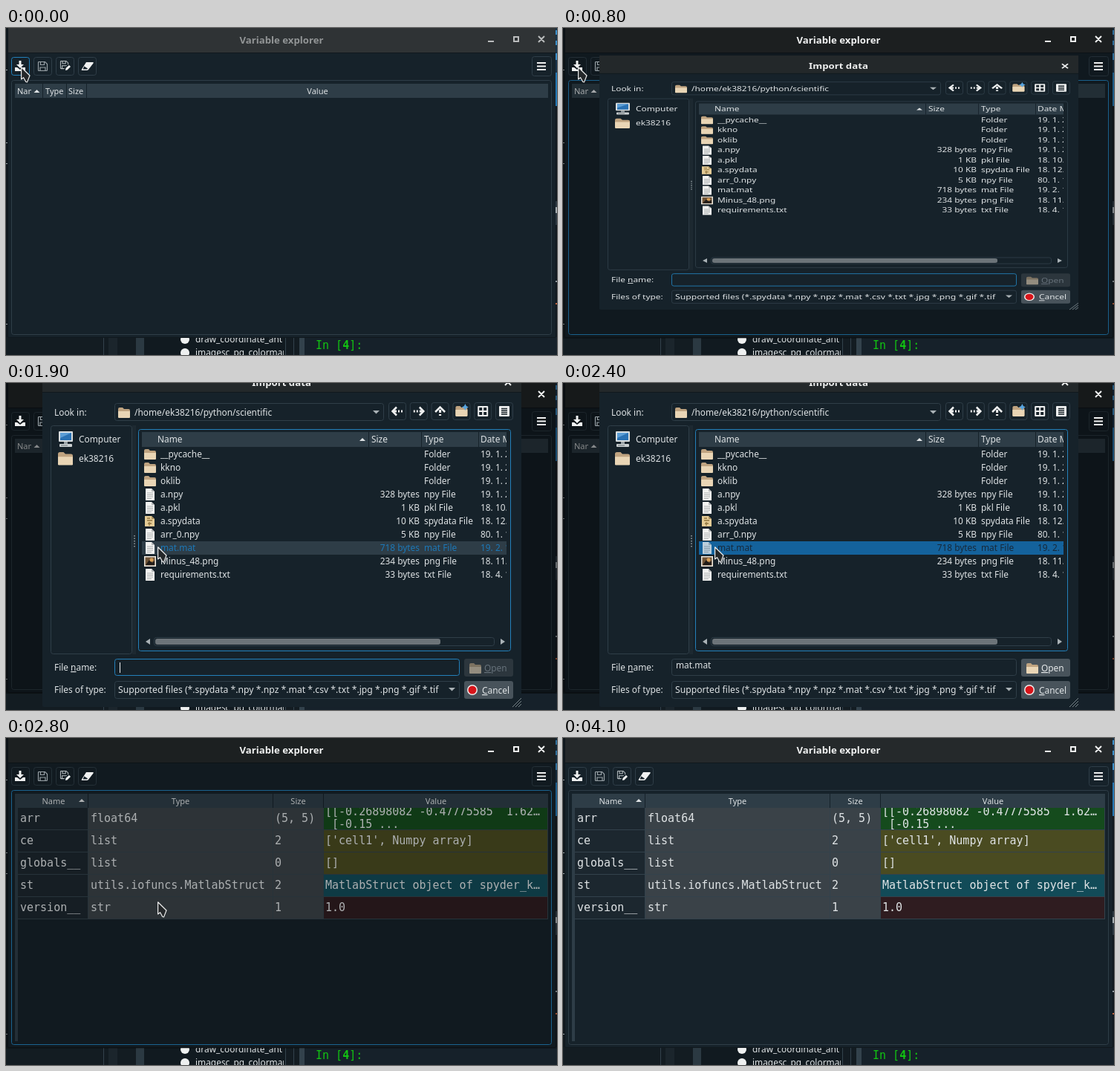
These frames come from a looping animation (742x440 px, 4200 ms). An HTML page:

```html
<!DOCTYPE html>
<html lang="en">
<head>
<meta charset="utf-8">
<title>Variable explorer</title>
<style>
html, body { margin: 0; width: 100%; height: 100%; overflow: hidden; background: #10181e; }
svg { display: block; width: 742px; height: 440px; }
text { white-space: pre; fill: #dfe3e5; }
.ui { font: 11.9px "Noto Sans", sans-serif; }
.wide { font: 12.2px "Noto Sans", sans-serif; }
.head { font: 11px "Noto Sans", sans-serif; }
.title { font: bold 13.2px "Noto Sans", sans-serif; fill: #eff0f0; }
.mono { font: 15px "DejaVu Sans Mono", monospace; }
.prompt { font: 15px "DejaVu Sans Mono", monospace; fill: #12c412; }
.mid { text-anchor: middle; }
.end { text-anchor: end; }
.line { fill: none; stroke: #2f3e48; }
.line.hot { stroke: #2380ba; }
.row rect.bg { fill: none; }
.row.hover rect.bg { fill: #2e3d47; }
.row.hover text { fill: #1c78b8; }
.row.sel rect.bg { fill: #14629c; }
.row.sel text { fill: #17293a; }
.row.sel .icon { opacity: .75; }
#open rect { fill: #2c363d; }
#open text { fill: #66717a; }
#open .icon { opacity: .55; }
#open.on rect { fill: #48535b; }
#open.on text { fill: #e6e9ea; }
#open.on .icon { opacity: 1; }
</style>
</head>
<body>
<svg id="stage" viewBox="0 0 742 440" xmlns="http://www.w3.org/2000/svg"></svg>
<script>
const BODY = '#16222a', HEAD = '#2e3d47', WHITE = '#f0f1f1';
const USER = 'ek38216';

const rect = (x, y, w, h, fill, more = '') =>
  `<rect x="${x}" y="${y}" width="${w}" height="${h}" fill="${fill}" ${more}/>`;
const frame = (x, y, w, h, id = '', cls = '') =>
  `<rect id="${id}" class="line ${cls}" x="${x + .5}" y="${y + .5}" width="${w - 1}" height="${h - 1}" rx="3"/>`;
const text = (x, y, s, cls = 'ui', more = '') => `<text x="${x}" y="${y}" class="${cls}" ${more}>${s}</text>`;
const path = (d, fill, more = '') => `<path d="${d}" fill="${fill}" ${more}/>`;
const stroke = (d, color, width = 1, more = '') =>
  path(d, 'none', `stroke="${color}" stroke-width="${width}" ${more}`);
const at = (x, y, s, more = '') => `<g transform="translate(${x} ${y})" ${more}>${s}</g>`;
const clip = (id, x, y, w, h) => `<clipPath id="${id}">${rect(x, y, w, h, '#fff')}</clipPath>`;
const under = (before, key, after) => `${before}<tspan text-decoration="underline">${key}</tspan>${after}`;
const tri = (x, y, w, h) => path(`M${x} ${y + h}h${w}l${-w / 2} ${-h}z`, '#dfe3e5');

// icons, drawn from their top left corner
const folder = (s = 1) => `<g class="icon" transform="scale(${s})">` +
  path('M0 2q0-2 2-2h4l2 2h6q2 0 2 2v9H0z', '#bfa380') + path('M0 5h16v8q0 1-1 1H1q-1 0-1-1z', '#e9d5b5') + '</g>';
const sheet = '<g class="icon">' + path('M2 0h8l4 4v12H2z', '#f3f3f1') + path('M10 0v4h4z', '#b5b8b9') +
  stroke('M4 6h8M4 8.5h8M4 11h8M4 13.5h6', '#a9adaf') + '</g>';
const pack = '<g class="icon">' + path('M1 1h9l4 4v10H1z', '#e4cb96') + path('M10 1v4h4z', '#a88e5c') +
  stroke('M4 4h4M4 7h7M7 9v5M5 11h5', '#8f743f', 1.3) + '</g>';
const photo = '<g class="icon">' + rect(0, 1, 16, 14, '#efe9df') + rect(1.5, 2.5, 13, 11, '#705539') +
  path('M2 13l5-7 4 4 3-3v6z', '#221c18') + '<circle cx="10" cy="6" r="2.5" fill="#d69e57"/></g>';
const monitor = rect(1, 0, 19, 14, '#d9dee0', 'rx="1"') + rect(3, 2, 15, 10, '#2a72b4') +
  path('M3 2h15L3 9z', '#5c9ed6') + rect(8, 14, 5, 3, '#9aa2a6') + rect(2, 17, 17, 4, '#cbd0d2', 'rx="1"') +
  stroke('M4 19h9', '#6d767b');
const floppy = color => stroke('M.5 1.5q0-1 1-1h8l3 3v8q0 1-1 1h-10q-1 0-1-1zM3.5 .5v4h5v-4M3 12.5V8h7v4.5', color, 1.2);

function backdrop() {
  return rect(0, 0, 742, 440, '#10181e') +
    rect(0, 416, 742, 24, '#131c22') + rect(138, 416, 12, 24, '#1b252c') +
    rect(175, 416, 11, 24, '#2b3942') + rect(186, 416, 190, 24, '#111a20') + rect(395, 416, 7, 24, '#33424c') +
    rect(402, 416, 340, 24, '#16212a') + stroke('M131.5 416v24M376.5 416v24M387.5 416v24', '#33424c') +
    [['draw_coordinate_ant', 423], ['imagesc_pg_colormap', 441]].map(([s, y]) =>
      `<circle cx="241" cy="${y - 4}" r="6" fill="#eef0f0"/>` + text(255, y, s, 'ui', 'clip-path="url(#tree)"')).join('') +
    text(417, 432, 'In [<tspan font-weight="bold">4</tspan>]:', 'prompt') +
    stroke('M0 56.5h2M0 154.5h2M0 182.5h2M0 398.5h2', '#9aa3a8') +
    rect(740, 0, 2, 60, '#153148') + rect(740, 60, 2, 45, '#2378b4') +
    stroke('M741 3v6M741 17v6M741 34v9', '#3a8fca', 2) +
    rect(740, 233, 2, 32, '#2b3740') + stroke('M741 241v8', '#cfd4d6', 1.5) +
    stroke('M741 340v2', '#8d969b', 2) + stroke('M741 370v2', '#c0623c', 2);
}

function emptyTable() {
  return rect(12, 75, 718, 19, HEAD) + stroke('M49.5 75v19M81.5 75v19M108.5 75v19', BODY) +
    text(15, 89, 'Name', 'head', 'clip-path="url(#nar)"') + tri(37.5, 83, 8, 4) +
    text(53, 89, 'Type', 'head') + text(84, 89, 'Size', 'head') + text(419.5, 89, 'Value', 'head mid');
}

function fullTable() {
  const rows = [
    ['arr', 'float64', '(5, 5)', '', '#154b1d'],
    ['ce', 'list', '2', "['cell1', Numpy array]", '#4a4b21'],
    ['globals__', 'list', '0', '[]', '#4a4b21'],
    ['st', 'utils.iofuncs.MatlabStruct', '2', 'MatlabStruct object of spyder_k…', '#124b58'],
    ['version__', 'str', '1', '1.0', '#2f1c20']
  ];
  const cells = rows.map(([name, type, size, value, color], i) => {
    const y = 94 + 30 * i, base = y + 19;
    return rect(16, y, 94, 30, '#1c272f') + rect(110, y, 317, 30, '#3a4248') + rect(427, y, 303, 30, color) +
      stroke(`M16 ${y + 29.5}h714`, '#33424c') +
      text(19, base, name, 'mono') + text(114, base, type, 'mono') +
      text(362, base, size, 'mono') + text(430, base, value, 'mono');
  }).join('');
  return rect(12, 75, 4, 333, HEAD) + rect(16, 75, 714, 19, HEAD) +
    stroke('M110.5 75v19M359.5 75v19M427.5 75v19', BODY) +
    text(64, 89, 'Name', 'head mid') + tri(98, 82, 8, 4) + text(235, 89, 'Type', 'head mid') +
    text(393.5, 89, 'Size', 'head mid') + text(579, 89, 'Value', 'head mid') + cells +
    stroke('M110.5 94v150M359.5 94v150M427.5 94v150M729.5 94v150', '#33424c') +
    '<g clip-path="url(#arr)">' + text(430, 104, '[[-0.26898082 -0.47775585  1.62…', 'mono') +
    text(430, 121, ' [-0.15 ...', 'mono') + '</g>';
}

function mainWindow() {
  const icons =
    at(12, 44, path('M5.5 0h3v5h3.5l-5 5-5-5h3.5z', WHITE) + path('M0 9h3l4 3 4-3h3v5H0z', WHITE)) +
    at(43, 45, floppy('#98a1a6')) +
    at(73, 44, `<g transform="scale(.85)">${floppy('#b9c0c3')}</g>` +
      path('M5 13l1-4 5-4 3 3-5 4z', BODY) + path('M7 13l.5-3 4.5-4 2 2-4.5 4.5z', WHITE)) +
    at(101, 45, path('M7 1h9q1.5 0 .5 1.5L10 11q-1 1-2 1H1.5Q0 12 1 10.500z', WHITE) + path('M4.300 6.500L9 9.500l-1 1H2.500z', BODY)) +
    stroke('M715 47h12M715 51.500h12M715 56h12', WHITE, 2) +
    '<g id="controls">' + stroke('M649 18h8M684 12h6v6h-6zM717 11l8 8M725 11l-8 8', WHITE, 2) + '</g>';
  return rect(3, 0, 737, 417, BODY, 'rx="3"') + rect(3, 0, 737, 33, '#25292b', 'id="bar"') +
    stroke('M3 33.5h737M3 416.5h737', '#10181d') +
    frame(7, 39, 25, 25, 'importBox') + [37, 67, 97].map(x => frame(x, 39, 25, 25)).join('') +
    frame(708, 38, 27, 27) + frame(7, 70, 728, 343, 'mainFrame') +
    `<g id="empty">${emptyTable()}</g><g id="full">${fullTable()}</g>` +
    rect(0, 0, 742, 418, '#000', 'id="dim"') + icons +
    text(371, 21, 'Variable explorer', 'title mid', 'id="caption"');
}

function files() {
  const list = [
    ['__pycache__', '', 'Folder', '19. 1. 2'],
    ['kkno', '', 'Folder', '19. 1. 2'],
    ['oklib', '', 'Folder', '19. 1. 2'],
    ['a.npy', '328 bytes', 'npy File', '19. 1. 2'],
    ['a.pkl', '1 KB', 'pkl File', '18. 10. 2'],
    ['a.spydata', '10 KB', 'spydata File', '18. 12. 2'],
    ['arr_0.npy', '5 KB', 'npy File', '80. 1. 1'],
    ['mat.mat', '718 bytes', 'mat File', '19. 2. 1'],
    ['Minus_48.png', '234 bytes', 'png File', '18. 11. 2'],
    ['requirements.txt', '33 bytes', 'txt File', '18. 4. 1']
  ];
  return list.map(([name, size, type, date], i) => {
    const y = 87 + 18 * i, base = y + 13;
    const icon = type === 'Folder' ? folder() : name.endsWith('spydata') ? pack : name.endsWith('png') ? photo : sheet;
    return '<g class="row">' + `<rect class="bg" x="183" y="${y}" width="491" height="18"/>` +
      at(186, y + (type === 'Folder' ? 2 : 1), icon) + text(208, base, name) +
      text(557, base, size, 'ui end') + text(563, base, type) + text(639, base, date) + '</g>';
  }).join('');
}

function dialog() {
  const tools = [
    stroke('M7 12h4M13 12h2M17 12h2', WHITE, 3) + stroke('M11 6.500L5.500 12l5.500 5.500', WHITE, 2.5),
    stroke('M5 12h2M9 12h2M13 12h4', WHITE, 3) + stroke('M13 6.500l5.500 5.500-5.500 5.500', WHITE, 2.5),
    stroke('M12 10v4M12 16v2', WHITE, 3) + stroke('M5.500 13L12 6.500l6.500 6.500', WHITE, 2.5),
    at(4, 5, folder()) + path('M17 2l1.500 3 3 1.500-3 1.500-1.500 3-1.500-3-3-1.500 3-1.500z', '#58a5e0'),
    rect(5, 5, 14, 14, WHITE, 'rx="1"') + [[7, 7], [13, 7], [7, 13], [13, 13]].map(p => rect(...p, 4, 4, '#1a242b')).join(''),
    rect(5, 5, 14, 14, WHITE, 'rx="1"') + stroke('M8 8.500h8M8 11h8M8 13.500h8M8 16h8', '#1a242b', 1.4)
  ].map((icon, i) => at(515 + 28.8 * i, 26, frame(0, 0, 24, 24) + icon)).join('');

  return rect(49, -20, 645, 456, BODY, 'rx="2"') + rect(49, -20, 645, 32, '#23282a') +
    stroke('M49 12.5h645', '#10181d') + text(371, 4, 'Import data', 'title mid') +
    stroke('M672-5l8 8M680-5l-8 8', WHITE, 2) +
    text(65, 44, 'Look in:') + frame(146, 27, 363, 24) + at(151, 33, folder()) +
    text(173, 44, `/home/${USER}/python/scientific`) + path('M494 37h9l-4.500 4.500z', '#aab2b6') + tools +
    frame(60, 57, 110, 308) + at(70, 65, monitor) + text(98, 80, 'Computer') +
    at(70, 93, folder(1.25)) + text(98, 106, USER) +
    rect(170, 57, 5, 308, '#1d2931') + stroke('M173 205v17', '#7b868c', 2, 'stroke-dasharray="1.500 2"') +
    frame(178, 62, 502, 299, 'listFrame') + rect(183, 66, 491, 20, HEAD) +
    stroke('M488.5 66v20M559.5 66v20M636.5 66v20', BODY) + tri(476, 74, 8, 4) +
    '<g clip-path="url(#list)">' + text(204, 80, 'Name') + text(492, 80, 'Size') + text(563, 80, 'Type') +
    text(639, 80, 'Date Modified') + files() + '</g>' +
    path('M194 344v8l-6-4zM666 344v8l6-4z', '#aab2b6') + frame(199, 342, 459, 12) +
    rect(201, 344, 384, 8, '#6c7479', 'rx="3"') +
    text(65, 387, under('File ', 'n', 'ame:')) + frame(146, 371, 465, 23, 'field') +
    text(152, 384, 'mat.mat', 'ui', 'id="chosen"') + rect(153, 376, 1, 14, WHITE, 'id="caret"') +
    text(65, 417, 'Files of type:') + frame(146, 401, 465, 24) +
    text(151, 417, 'Supported files (*.spydata *.npy *.npz *.mat *.csv *.txt *.jpg *.png *.gif *.tif', 'wide') +
    path('M596 410h9l-4.500 4.500z', '#aab2b6') +
    '<g id="open">' + rect(617, 371, 66, 24, '', 'rx="3"') + at(624, 377, folder()) +
    text(644, 388, under('', 'O', 'pen')) + '</g>' +
    rect(617, 401, 66, 24, '#48535b', 'rx="3"') +
    '<circle cx="628" cy="413" r="7" fill="#f1eded"/><circle cx="628" cy="413" r="5.500" fill="#d8141a"/>' +
    text(641, 418, under('', 'C', 'ancel')) +
    stroke('M682 436l12-12M686 436l8-8M690 436l4-4', '#7b868c');
}

const stage = document.getElementById('stage');
stage.innerHTML = '<defs>' + clip('tree', 186, 416, 188, 24) + clip('nar', 12, 75, 22, 19) +
  clip('arr', 428, 94, 301, 29) + clip('list', 183, 63, 491, 296) + '</defs>' +
  backdrop() + mainWindow() + `<g id="dialog">${dialog()}</g>` +
  '<g id="cursor">' + path('M.6 .8V17l3-2.300 3.200 5.800 1.700 .4L12 12z', '#25282a', 'stroke="#eceded" stroke-width="1.200" stroke-linejoin="round"') + '</g>';

const $ = id => document.getElementById(id);
const rows = [...document.querySelectorAll('.row')];
const clamp = v => Math.max(0, Math.min(1, v));
const lerp = (a, b, p) => a + (b - a) * p;
const easeOut = p => 1 - (1 - p) ** 2;
const show = (id, on) => $(id).setAttribute('visibility', on ? 'visible' : 'hidden');
const hot = (id, on) => $(id).classList.toggle('hot', on);
const grey = (a, b, p) => `rgb(${a.map((v, i) => Math.round(lerp(v, b[i], p)))})`;

function pointer(t) {
  if (t < 1400) return [20, 52];
  const go = easeOut(clamp((t - 1400) / 400));
  const away = clamp((t - 3500) / 400) ** 1.3;
  return [lerp(lerp(110, 204, go), 98, away), lerp(lerp(147, 220, go), 48, away)];
}

function dimming(t) {
  if (t >= 2900) return 0;
  if (t >= 2700) return t < 2800 ? .36 : .23;
  return .4 * easeOut(clamp((t - 600) / 500));
}

function draw(t) {
  const active = clamp((t - 400) / 200);
  $('bar').style.fill = grey([47, 51, 53], [37, 41, 43], active);
  $('caption').style.fill = grey([146, 149, 150], [240, 241, 241], active);
  $('controls').style.opacity = lerp(.72, 1, active);
  hot('importBox', t < 500);
  hot('mainFrame', (t >= 500 && t < 1000) || (t >= 2700 && t < 4100));
  show('empty', t < 2700);
  show('full', t >= 2700);
  $('dim').style.opacity = dimming(t);

  const isOpen = t >= 700 && t < 2800;
  const scale = t >= 2700 ? .98 : easeOut(clamp((t - 600) / 400));
  $('dialog').style.display = isOpen ? '' : 'none';
  $('dialog').setAttribute('transform', `translate(0 208) scale(1 ${scale}) translate(0 -208)`);

  const [x, y] = pointer(t);
  const picked = t >= 2400;
  const over = x > 183 ? Math.floor((y - 87) / 18) : -1;
  rows.forEach((row, i) => {
    row.classList.toggle('hover', !picked && i === over);
    row.classList.toggle('sel', picked && i === 7);
  });
  hot('listFrame', x > 178);
  hot('field', !picked);
  $('chosen').style.display = picked ? '' : 'none';
  $('caret').style.display = (t >= 1100 && t < 1400) || (t >= 1900 && t < 2400) ? '' : 'none';
  $('open').classList.toggle('on', picked);
  $('cursor').setAttribute('transform', `translate(${Math.round(x)} ${Math.round(y)})`);
  show('cursor', t < 4100);
}

const start = performance.now();
function tick() {
  const t = (performance.now() - start) % 4200;
  draw(Math.floor(t / 100) * 100);
  requestAnimationFrame(tick);
}
tick();
</script>
</body>
</html>
```
